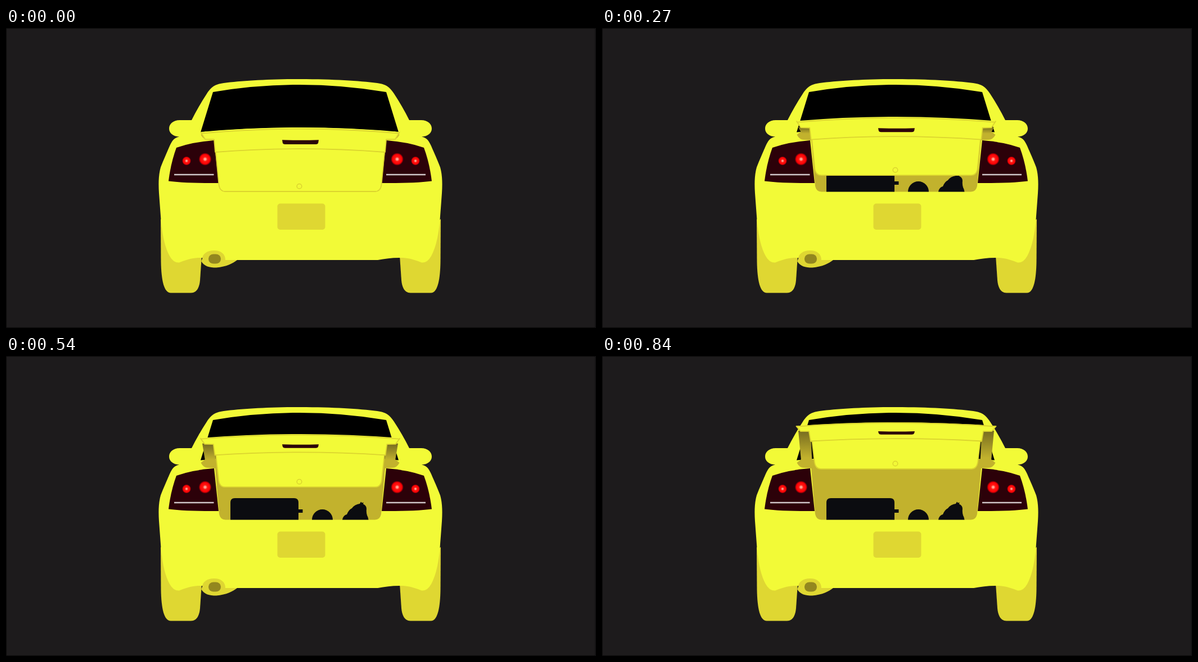
Recreate the animation shown at these times as an HTML page. Size 1049 by 534 pixels, loop 870 ms.

```html
<!DOCTYPE html>
<html lang="en">
<head>
<meta charset="utf-8">
<title>Car boot opening</title>
<style>
  html, body { margin: 0; width: 100%; height: 100%; overflow: hidden; background: #1d1b1c; }
  svg { display: block; width: 100%; height: 100%; }
  .paint { fill: #f2fa37; }
  .shade { fill: #dfd732; }
  .inside { fill: #c2b22d; }
  .lamp { fill: #2c0109; }
  .cargo { fill: #0b0c10; }
  .seam { fill: none; stroke: #dbd42f; stroke-width: 1.8; stroke-linejoin: round; }
</style>
</head>
<body>
<svg viewBox="0 0 1049 534" preserveAspectRatio="none">
  <defs>
    <radialGradient id="glow">
      <stop offset="0" stop-color="#ffc0b0"/>
      <stop offset=".2" stop-color="#ff8072"/>
      <stop offset=".36" stop-color="#ff1a14"/>
      <stop offset=".78" stop-color="#fb0004"/>
      <stop offset="1" stop-color="#8a0006" stop-opacity=".5"/>
    </radialGradient>
    <linearGradient id="strutFill" gradientUnits="userSpaceOnUse" x1="0" x2="0" y1="134" y2="190">
      <stop offset="0" stop-color="#766b20"/>
      <stop offset=".85" stop-color="#c2b22d"/>
    </linearGradient>

    <path id="wheel" class="shade" d="M275 340 L275.500 415 C276 450 281 471.500 293 471.500 L329 471.500 C340 471.500 344 460 345 449 L348 405 Z"/>
    <path id="half" class="paint" d="M524 91 C465 91 420 94 387 98 C371 100 365 105 357 117 C347 132 338 148 330 164 L309 164 C297 164 290 171 290 179 C290 187 297 193 308 193.500 C297 196 295 202 291 210 C285 224 280 235 275 248 C271 262 271 278 272 294 L276 348 C279 373 283 391 291 406 Q298 418.500 308 417.500 C326 410 337 408.500 348 409 C362 409 374 411 386 413 L524 413 Z"/>
    <path id="lampHalf" class="lamp" d="M303 213 Q331 203 370 200 L378 276 Q320 276.500 289 272.500 Q293 240 303 213 Z"/>
    <path id="strut" fill="url(#strutFill)"/>
  </defs>

  <rect width="1049" height="534" fill="#1d1b1c"/>
  <rect x=".5" y=".5" width="1047.500" height="533" fill="none" stroke="#080808"/>

  <use href="#wheel"/>
  <use href="#wheel" transform="translate(1048 0) scale(-1 1)"/>
  <use href="#half"/>
  <use href="#half" transform="translate(1047 0) scale(-1 1)"/>

  <path class="shade" d="M347 415 C352 424 361 426.500 374 426.500 C392 425 403 419 411 413 L390 413 C390 402 382 396 370 396 C358 396 349 402 349 411 Z"/>
  <rect x="360" y="402.500" width="22" height="17" rx="9" ry="8" fill="#93871f"/>
  <rect class="shade" x="482.500" y="312.500" width="85" height="46.500" rx="5"/>

  <path d="M368 114 Q522 88 676 114 L698 185.500 Q522 169 346 185.500 Z"/>

  <path class="inside" d="M354 184 L346.500 190 Q351 199 359 199 L372 200 L379 281 Q381 291.500 390 291.500 L656 291.500 Q665 291.500 667 281 L674 200 L687 199 Q695 199 699.500 190 L692 184 Z"/>
  <g class="cargo">
    <path d="M399 291.500 V261 Q399 253 407 253 H512 Q520 253 520 261 V273 H527.500 V279 H520 V291.500 Z"/>
    <path d="M544 291.500 A18.500 18.500 0 0 1 581 291.500 Z"/>
    <path d="M598 291.500 Q599 284 606 282 Q609 274 615 271 Q620 264 629 263 L631 259.500 L633 261.500 L635.500 260.500 L635 263.500 Q641 266 641 272 Q640 281 643.500 287 L644.500 291.500 Z"/>
  </g>
  <use href="#strut"/>
  <use href="#strut" transform="translate(1046 0) scale(-1 1)"/>

  <use href="#lampHalf"/>
  <use href="#lampHalf" transform="translate(1046 0) scale(-1 1)"/>
  <g fill="url(#glow)">
    <circle cx="354" cy="233.500" r="11"/>
    <circle cx="321" cy="236.500" r="7.800"/>
    <circle cx="695.500" cy="233.500" r="11"/>
    <circle cx="728" cy="236.500" r="7.800"/>
  </g>
  <path d="M299 261 H369.500 M676 261 H746" stroke="#cfc6c8" stroke-width="2.500"/>

  <path id="lid" class="paint"/>
  <path id="rim" class="seam"/>
  <path id="edge" class="seam"/>
  <path id="crease" class="seam"/>
  <path id="brake" class="lamp"/>
  <circle id="lock" class="seam" cx="521.500" r="4.300" style="stroke-width:1.500"/>
</svg>
<script>
  const LOOP = 870, STEP = 30, LAST = LOOP / STEP - 1;
  const el = id => document.getElementById(id);

  // left outline of the lid, top to bottom: x, y closed, x, y open
  const SIDE = [
    [346, 185, 345, 124.5],
    [354, 198, 353, 134],
    [370, 198.5, 368, 134],
    [372, 221, 371, 151.5],
    [373, 221, 373.5, 152],
    [378.5, 279, 378, 190],
    [380, 291, 380, 201],
    [390, 291, 389, 201]
  ];

  const flip = ([x, y]) => [1046 - x, y];
  const line = pts => pts.map(p => 'L' + p).join('');

  function draw(p) {
    const mix = (a, b) => +(a + (b - a) * p).toFixed(2);
    const left = SIDE.map(([ax, ay, bx, by]) => [mix(ax, bx), mix(ay, by)]);
    const right = left.map(flip);
    const bow = (x, y, mid) => `M${x} ${y}Q523 ${2 * mid - y} ${1046 - x} ${y}`;

    const outline = 'M' + left[0] + line(left.slice(1, 6)) +
      `Q${left[6]} ${left[7]}L${right[7]}Q${right[6]} ${right[5]}` +
      line(right.slice(0, 5).reverse());
    const top = mix(177, 118);
    el('lid').setAttribute('d', `${outline}Q523 ${2 * top - left[0][1]} ${left[0]}Z`);
    el('edge').setAttribute('d', outline);
    el('rim').setAttribute('d', bow(mix(348, 346), mix(187.5, 125.5), mix(179.5, 119)));
    el('crease').setAttribute('d', bow(left[3][0], left[3][1], mix(215, 147)));

    const b0 = mix(199.3, 134), b1 = mix(207, 139.7);
    el('brake').setAttribute('d',
      `M491 ${b0}Q523.5 ${b0 + 1} 556 ${b0}L555 ${b1 - 2}Q554 ${b1} 551 ${b1}H496Q493 ${b1} 492 ${b1 - 2}Z`);
    el('lock').setAttribute('cy', mix(281.7, 191.5));

    const y = left[1][1] - 1;
    el('strut').setAttribute('d', y < 184 ? `M349 ${y}H371L374 200L354 186Z` : '');
    el('strutFill').setAttribute('y1', y);
  }

  function tick() {
    draw(Math.floor(performance.now() % LOOP / STEP) / LAST);
    requestAnimationFrame(tick);
  }
  tick();
</script>
</body>
</html>
```
